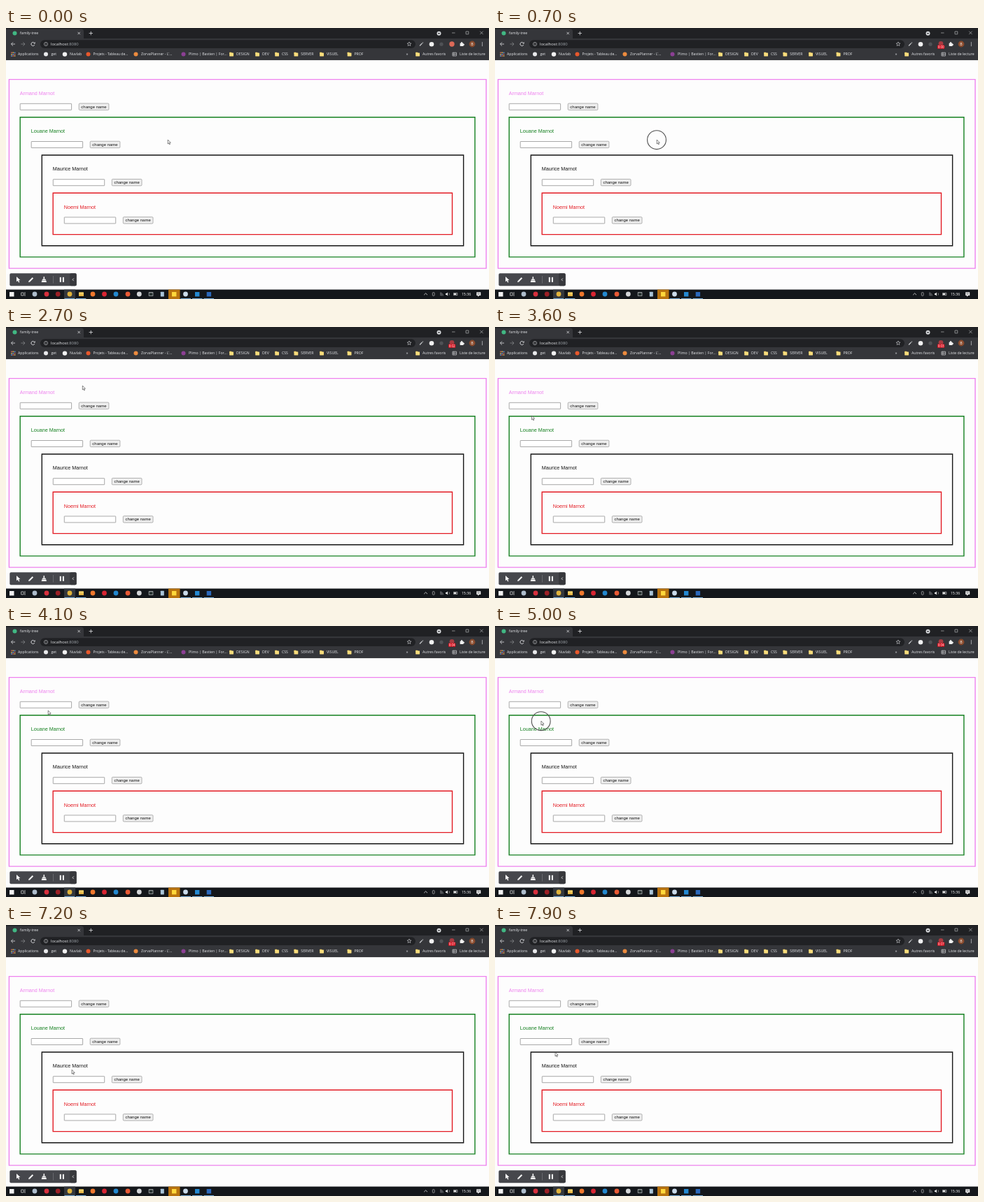
Write an HTML page with a canvas that moves like this. It is 690x388 px and loops after 8000 ms.

```html
<!DOCTYPE html>
<html lang="fr">
<head>
<meta charset="utf-8">
<title>family-tree</title>
<style>
html, body { margin: 0; width: 100%; height: 100%; overflow: hidden; background: #fdfdfd; }
canvas { display: block; width: 690px; height: 388px; }
</style>
</head>
<body>
<canvas id="stage"></canvas>
<script>
const W = 690, H = 388, LOOP = 8000, STEP = 100;
const UI = '"Open Sans", "Noto Sans", sans-serif';
const PAGE = '"Liberation Sans", Arial, sans-serif';
const canvas = document.getElementById('stage');
const ratio = window.devicePixelRatio || 1;
canvas.width = W * ratio;
canvas.height = H * ratio;
const ctx = canvas.getContext('2d');
ctx.scale(ratio, ratio);

function box(x, y, w, h, fill, r = 0) {
  ctx.fillStyle = fill;
  ctx.beginPath();
  ctx.roundRect(x, y, w, h, r);
  ctx.fill();
}

function frame(x, y, w, h, color, width = 1, r = 0) {
  ctx.strokeStyle = color;
  ctx.lineWidth = width;
  ctx.beginPath();
  ctx.roundRect(x, y, w, h, r);
  ctx.stroke();
}

function dot(x, y, r, fill) {
  ctx.fillStyle = fill;
  ctx.beginPath();
  ctx.arc(x, y, r, 0, Math.PI * 2);
  ctx.fill();
}

function ring(x, y, r, color, width = 0.8, from = 0, to = Math.PI * 2) {
  ctx.strokeStyle = color;
  ctx.lineWidth = width;
  ctx.beginPath();
  ctx.arc(x, y, r, from, to);
  ctx.stroke();
}

function trace(points) {
  ctx.beginPath();
  for (let i = 0; i < points.length; i += 2) ctx.lineTo(points[i], points[i + 1]);
}

function line(points, color = '#dcdde0', width = 0.8) {
  trace(points);
  ctx.strokeStyle = color;
  ctx.lineWidth = width;
  ctx.stroke();
}

function shape(points, fill) {
  trace(points);
  ctx.closePath();
  ctx.fillStyle = fill;
  ctx.fill();
}

function text(str, x, y, size = 5.2, color = '#e8eaed', font = UI, align = 'left') {
  ctx.font = `${size}px ${font}`;
  ctx.textAlign = align;
  ctx.fillStyle = color;
  ctx.fillText(str, x, y);
}

function folder(x, label) {
  box(x - 2.8, 34.8, 3, 2, '#f0cf62', 0.4);
  box(x - 2.8, 35.5, 5.8, 4.9, '#f9dd7c', 0.4);
  text(label, x + 7, 39.4);
}

function drawTabs() {
  box(0, 0, W, 16, '#202124');
  box(-4, 1.5, 115, 18, '#35363a', 3.5);
  dot(12.5, 7.5, 3, '#41b883');
  text('family-tree', 20, 9.3);
  line([102.5, 5.8, 105.9, 9.2]);
  line([105.9, 5.8, 102.5, 9.2]);
  line([118.6, 7.5, 124, 7.5]);
  line([121.3, 4.8, 121.3, 10.2]);
  dot(618.5, 7.7, 3, '#d5d7da');
  shape([617, 7, 620, 7, 618.5, 9], '#202124');
  line([637, 7, 641.5, 7], '#c8c9cc', 0.6);
  frame(657, 5, 3.8, 3.8, '#c8c9cc', 0.6);
  line([677.2, 4.7, 681.6, 9.1], '#c8c9cc', 0.6);
  line([681.6, 4.7, 677.2, 9.1], '#c8c9cc', 0.6);
}

function drawAddressBar() {
  box(0, 15, W, 31.3, '#35363a');
  line([13, 23, 7.5, 23]);
  line([10, 20.4, 7.4, 23, 10, 25.6]);
  line([21.5, 23, 27, 23], '#85878a');
  line([24.4, 20.4, 27, 23, 24.4, 25.6], '#85878a');
  ring(38.5, 23, 2.6, '#dcdde0', 0.9, 0.4, 5.5);
  shape([39.2, 22.5, 41.6, 22.5, 41.6, 19.9], '#dcdde0');

  box(49, 17.2, 536, 11.8, '#202124', 5.9);
  ring(57, 23, 2.6, '#c8cacd', 0.6);
  line([57, 22.5, 57, 24.5], '#c8cacd', 0.6);
  line([57, 21.2, 57, 21.9], '#c8cacd', 0.6);
  text('localhost', 64, 25.2, 5.9);
  const hostWidth = ctx.measureText('localhost').width;
  text(':8080', 64 + hostWidth, 25.2, 5.9, '#9aa0a6');
  const star = [];
  for (let i = 0; i <= 10; i++) {
    const a = i * Math.PI / 5 - Math.PI / 2, r = i % 2 ? 1.4 : 3.1;
    star.push(576 + r * Math.cos(a), 23 + r * Math.sin(a));
  }
  line(star, '#d5d7da', 0.6);

  line([591, 25.5, 594.4, 22], '#c9cbce', 1.1);
  line([594.5, 22, 596, 20.5], '#8e9093', 1.2);
  dot(608, 23.2, 3.3, '#f1f1f1');
  dot(622, 23.2, 2.6, '#505256');
  box(648.6, 21.4, 4.9, 4.7, '#f1f1f1', 0.5);
  dot(651, 21.1, 1.1, '#f1f1f1');
  dot(653.8, 23.8, 1.1, '#f1f1f1');
  dot(666, 23, 4.4, '#8a4b2d');
  text('B', 666, 25, 5.2, '#fff', UI, 'center');
  for (const y of [20.8, 23, 25.2]) dot(680.4, y, 0.65, '#e8eaed');
}

function drawBookmarks() {
  const dots = ['#e66b5d', '#f0c75a', '#6fa8ee'];
  for (let i = 0; i < 9; i++) {
    box(7.2 + (i % 3) * 2.3, 34.6 + (i / 3 | 0) * 2.3, 1.5, 1.5, dots[(i + (i / 3 | 0)) % 3]);
  }
  text('Applications', 17, 39.4);
  dot(57, 37.6, 3, '#e9eaec');
  text('get', 64.5, 39.4);
  dot(84, 37.6, 3.2, '#f2f2f2');
  text('Nuvlab', 91, 39.4);
  dot(117.5, 37.6, 3, '#e8582c');
  text('Projets - Tableau de...', 124.5, 39.4, 5);
  dot(185.5, 37.6, 3, '#ec8b3e');
  text("ZorvaPlanner - L'...", 193, 39.4);
  dot(253.5, 37.6, 3, '#8c3f94');
  text('Plimo | Bastien | For...', 261, 39.4);
  folder(322, 'DESIGN');
  folder(359, 'DEV');
  folder(387, 'CSS');
  folder(414.3, 'SERVER');
  folder(451, 'VISUEL');
  folder(490.5, 'PROF');
  text('»', 571.5, 39.2, 6);
  folder(588, 'Autres favoris');
  frame(638, 35.2, 5.4, 4.7, '#dcdde0', 0.7);
  line([640, 35.2, 640, 39.9], '#dcdde0', 0.6);
  line([638, 37.5, 643.4, 37.5], '#dcdde0', 0.6);
  text('Liste de lecture', 648, 39.4);
}

// Each card: left, right, bottom, content x, colour, name.
const CARDS = [
  [4.4, 686, 344.1, 19.7, '#ee82ee', 'Armand Marnot'],
  [20.2, 669.9, 327.9, 35.7, '#158020', 'Louane Marnot'],
  [51.3, 653.6, 311.7, 66.8, '#151515', 'Maurice Marnot'],
  [67.2, 637.5, 295.6, 82.8, '#e31b23', 'Noemi Marnot']
];

function drawPage() {
  box(0, 46.3, W, 329, '#fdfdfd');
  CARDS.forEach(([left, right, bottom, x, color, name], i) => {
    const top = 73.6 + i * 54.2;
    frame(left, top, right - left, bottom - top, color, 1.4);
    text(name, x, top + 22.3, 7.19, color, PAGE);
    box(x + 0.3, top + 34.6, 73.6, 9.2, '#fff');
    frame(x + 0.5, top + 34.7, 73.4, 9, '#858585', 0.7, 0.4);
    box(x + 84.3, top + 34.2, 43, 9.8, '#efefef', 1.2);
    frame(x + 84.5, top + 34.4, 42.7, 9.4, '#858585', 0.6, 1.2);
    text('change name', x + 105.8, top + 41, 5.99, '#111', PAGE, 'center');
  });
}

function drawTools() {
  box(5.3, 351.2, 95.4, 18, '#46474c', 1.8);
  box(91.2, 351.2, 9.5, 18, '#37383c', 1.8);
  shape([15, 356, 15, 363.2, 16.8, 361.7, 18.2, 364.5, 19.4, 363.9, 18.1, 361.2, 20.4, 361], '#fff');
  line([33.4, 362.7, 38.4, 357.7], '#f4f4f4', 2);
  shape([32, 364.1, 32.7, 361.7, 34.4, 363.4], '#f4f4f4');
  line([54.3, 356, 54.3, 360], '#f4f4f4', 1.5);
  shape([52, 359.5, 56.6, 359.5, 58, 364, 50.6, 364], '#f4f4f4');
  line([51.5, 361.3, 57.1, 361.3], '#46474c', 0.5);
  line([67.5, 355, 67.5, 365.5], '#77787c', 0.7);
  box(76.8, 356.8, 2, 7, '#fff');
  box(80.9, 356.8, 2, 7, '#fff');
  line([96.8, 358.5, 95, 360.3, 96.8, 362.1], '#f0f0f0', 0.8);
}

function drawTaskbar() {
  box(0, 374.5, W, 13.5, '#14171b');
  box(83, 374.5, 16, 13.5, '#33373c');
  box(232, 374.5, 16.5, 13.5, '#b8730f');
  for (const x of [83.5, 99.8, 249.5, 266, 282.5]) box(x, 387, 14.5, 1, '#78aeda');

  box(5, 378, 6.5, 6.5, '#f2f2f2');
  frame(21.7, 379, 3.4, 4, '#e5e5e5', 0.7);
  line([27, 378, 27, 384], '#e5e5e5', 0.7);
  const circles = [
    [41, '#aebdcc'], [58, '#d7303d'], [74.2, '#9c2026'], [91, '#e0b33b'],
    [124, '#f0782d'], [140.5, '#d92532'], [157, '#2489cf'], [174, '#e85a35'],
    [190.3, '#d4d6d8'], [256.5, '#cadbea']
  ];
  for (const [x, color] of circles) dot(x, 381, 3.4, color);
  box(104, 378.3, 7, 5.7, '#f2cf66', 0.4);
  box(104, 381.5, 7, 2.5, '#e4b343');
  box(203.8, 378.2, 6.5, 5.6, '#bfc3c5', 0.5);
  box(204.5, 379.2, 5.1, 3.9, '#26302f');
  box(220.8, 377.8, 5, 6.6, '#a9c4d8', 0.4);
  box(237, 378, 6.4, 6.4, '#ffd83b');
  box(270, 378, 6.4, 6.4, '#2489d2');
  box(286.7, 378, 6.4, 6.4, '#2b69bd');

  line([597.2, 382.2, 599.6, 379.8, 602, 382.2], '#e4e4e4', 0.8);
  frame(609.3, 378.6, 2.8, 4.8, '#d9d9d9', 0.6, 1);
  for (let i = 0; i < 3; i++) ring(620, 383.4, 1.4 + i * 1.5, '#b5b7ba', 0.6, -Math.PI / 2, 0);
  shape([628, 380, 629.2, 380, 631, 378.4, 631, 383.6, 629.2, 382, 628, 382], '#e4e4e4');
  ring(631, 381, 2.4, '#c9c9c9', 0.6, -0.8, 0.8);
  frame(639.5, 379.4, 5.3, 3.2, '#e4e4e4', 0.6);
  box(640, 380, 3.2, 2, '#e4e4e4');
  text('15:36', 657.5, 383, 5.2, '#fff', UI, 'center');
  box(672.2, 378.2, 6, 4.8, '#f4f4f4', 0.3);
  shape([674, 383, 676, 383, 674, 384.8], '#f4f4f4');
  line([673.3, 379.8, 677, 379.8], '#24272b', 0.5);
  line([673.3, 381.3, 677, 381.3], '#24272b', 0.5);
}

function drawRecorder(t) {
  if (t < STEP) {
    dot(637, 23, 3.7, '#dd6a58');
    return;
  }
  dot(637, 22.4, 3.4, '#a83a40');
  if (t < 400) return;
  const seconds = Math.max(0, Math.floor((t - 50) / 1000));
  box(632, 24.4, 10.2, 5.4, '#d9101e', 0.8);
  text('0:0' + seconds, 637.1, 28.8, 4.4, '#fff', UI, 'center');
}

// Pointer stops: time, x, y.
const PATH = [
  [0, 231.2, 160], [1000, 231.2, 160], [2600, 109.3, 84], [2750, 109.3, 84],
  [3100, 51, 128], [3450, 51, 128], [4050, 60.2, 121], [4350, 60.2, 121],
  [4800, 65.9, 136], [5050, 65.9, 136], [5500, 86, 196], [5850, 86, 196],
  [6350, 104.3, 245.5], [6650, 104.3, 245.5], [7500, 90, 192],
  [7650, 90, 192], [7900, 86, 182]
];

function pointerAt(t) {
  const i = PATH.findIndex(stop => stop[0] > t);
  if (i < 0) return PATH[PATH.length - 1].slice(1);
  const [t0, x0, y0] = PATH[i - 1], [t1, x1, y1] = PATH[i];
  const p = (t - t0) / (t1 - t0), e = p * p * (3 - 2 * p);
  return [x0 + (x1 - x0) * e, y0 + (y1 - y0) * e];
}

function drawPointer(t) {
  const [x, y] = pointerAt(t);
  const clicked = (t >= 500 && t < 800) || (t >= 4800 && t < 5100);
  if (clicked) ring(x - 0.2, y + 0.2, 13.4, '#505050', 1.1);
  ctx.save();
  ctx.translate(x, y);
  const arrow = [0, 0, 0, 5.9, 1.4, 4.7, 2.3, 6.8, 3.2, 6.4, 2.3, 4.3, 4.1, 4.2, 0, 0];
  shape(arrow, '#fff');
  line(arrow, '#333', 0.6);
  ctx.restore();
}

function draw(now) {
  const t = Math.floor(now % LOOP / STEP) * STEP;
  drawTabs();
  drawAddressBar();
  drawRecorder(t);
  drawBookmarks();
  drawPage();
  drawTools();
  drawTaskbar();
  drawPointer(t);
}

let start;
function tick(now) {
  start ??= now;
  draw(now - start);
  requestAnimationFrame(tick);
}
draw(0);
requestAnimationFrame(tick);
</script>
</body>
</html>
```
